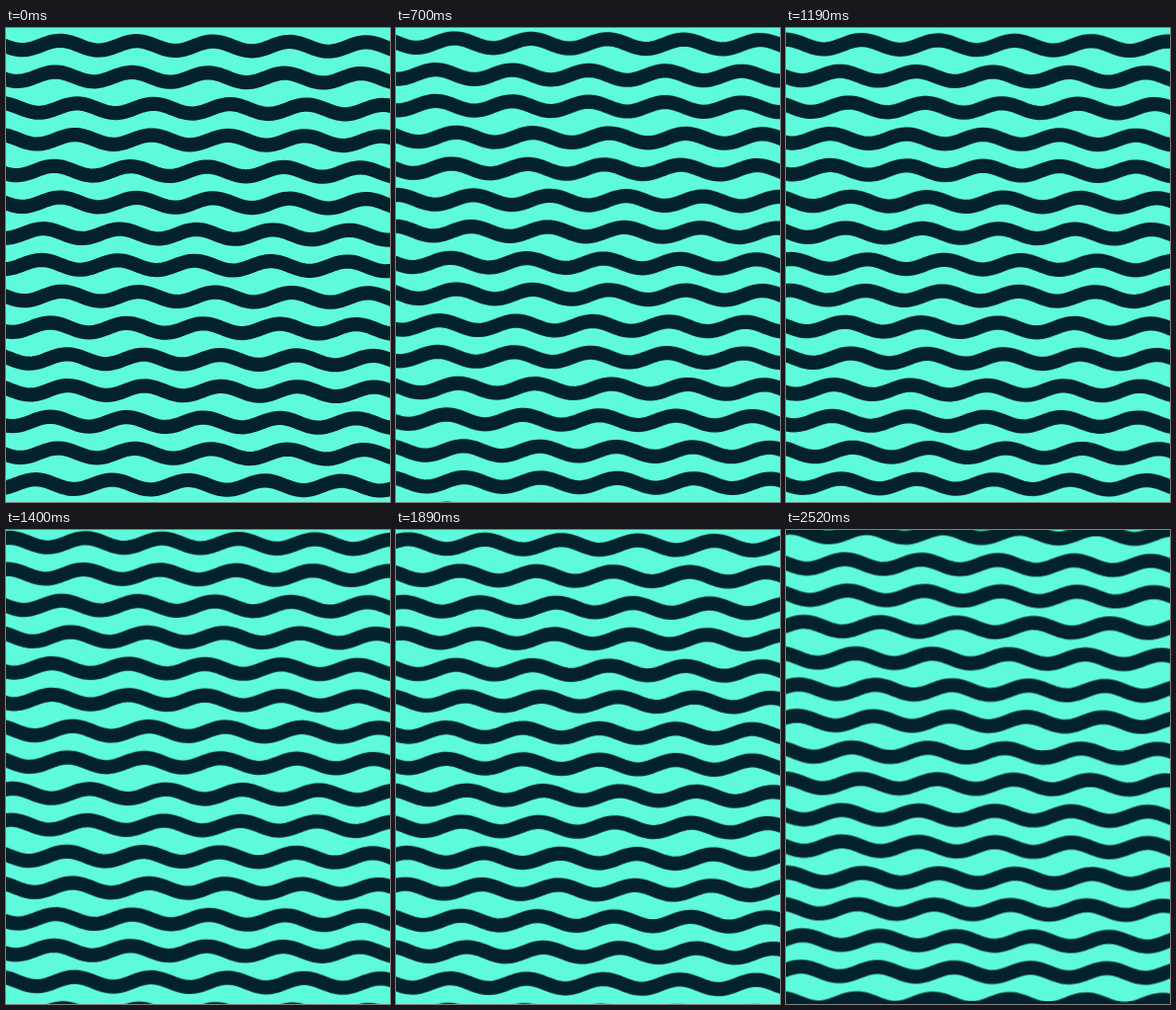
Animation, 389 px wide and 480 px high, one loop 2.59 s. Source, as an HTML page:

```html
<!DOCTYPE html>
<html lang="en">
<head>
<meta charset="utf-8">
<title>Waves</title>
<style>
  html, body { margin: 0; width: 100%; height: 100%; overflow: hidden; background: #5efadc; }
  svg { display: block; width: 389px; height: 480px; }
  #waves {
    fill: none;
    stroke: #03222b;
    stroke-width: 14.2;
    animation: drift 2590ms steps(37, end) infinite;
  }
  @keyframes drift {
    from { transform: translate(0, 0); }
    to { transform: translate(23.3px, 343.7px); }
  }
</style>
</head>
<body>
<svg viewBox="0 0 389 480"><g id="waves"></g></svg>
<script>
  const GAP = 31.75, LENGTH = 77.5, AMP = 4.8, TILT = 0.005;
  const FIRST = -11, BASE = 17.3;

  // x of the first crest in each row, top to bottom
  const crests = [
    59, 37, 40, 73, 48, 68, 66, 44, 53, 34, 34, 55, 50,
    72, 70, 49, 55, 38, 36, 57, 45, 62, 63, 45, 53, 30
  ];

  function wave(crest, y0) {
    const points = [];
    for (let x = -48; x <= 408; x += 3) {
      const y = y0 + TILT * x - AMP * Math.cos((x - crest) / LENGTH * 2 * Math.PI);
      points.push(x + ' ' + y.toFixed(2));
    }
    return 'M' + points.join('L');
  }

  const group = document.getElementById('waves');
  crests.forEach((crest, i) => {
    const path = document.createElementNS(group.namespaceURI, 'path');
    path.setAttribute('d', wave(crest, BASE + (FIRST + i) * GAP));
    group.append(path);
  });
</script>
</body>
</html>
```
